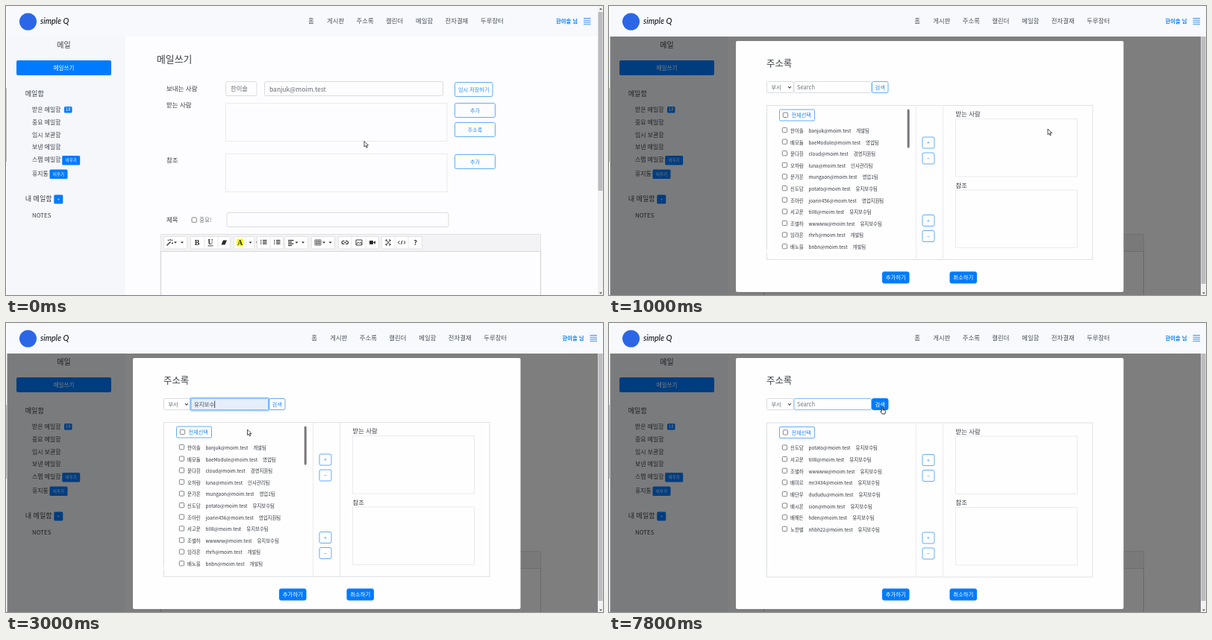
An HTML page for the animation above (8000 ms loop, 800x388 px).

```html
<!DOCTYPE html>
<html lang="ko">
<head>
<meta charset="utf-8">
<style>
html, body { margin: 0; width: 100%; height: 100%; overflow: hidden; background: #fdfdff; }
svg { display: block; }
text { font-family: "Noto Sans CJK KR", "Noto Sans CJK", sans-serif; white-space: pre; }
</style>
</head>
<body>
<svg id="stage" width="800" height="388" viewBox="0 0 800 388"></svg>
<script>
const stage = document.getElementById('stage');
const BLUE = '#007bff', DARK = '#3c4046', GREY = '#6c757d', LINE = '#dadce2', PALE = '#ebebf0';
const STEP = 200, LOOP = 8000;

const text = (x, y, size, str, fill = DARK, more = '') =>
  `<text x="${x}" y="${y + size * .36}" font-size="${size}" fill="${fill}" ${more}>${str}</text>`;
const mid = (x, y, size, str, fill, more = '') => text(x, y, size, str, fill, 'text-anchor="middle" ' + more);
const rect = (x, y, w, h, fill, r = 0, more = '') =>
  `<rect x="${x}" y="${y}" width="${w}" height="${h}" rx="${r}" fill="${fill}" ${more}/>`;
const frame = (x, y, w, h, stroke = LINE, fill = 'none', r = 0) =>
  rect(x + .5, y + .5, w - 1, h - 1, fill, r, `stroke="${stroke}"`);
const path = (d, stroke, width = 1, fill = 'none') =>
  `<path d="${d}" stroke="${stroke}" stroke-width="${width}" fill="${fill}"/>`;
const ring = (x, y, w, h) => rect(x - 1.5, y - 1.5, w + 3, h + 3, '#80bdff', 3, 'opacity=".75"');
const check = (x, y, s = 6.5, stroke = '#777') =>
  rect(x, y, s, s, '#fff', 1, `stroke="${stroke}" stroke-width=".9"`);
const button = (x, y, w, h, str, size, full, fill = BLUE, ink = '#fff') =>
  frame(x, y, w, h, full ? fill : '#62acf8', full ? fill : 'none', 2) +
  mid(x + w / 2, y + h / 2, size, str, full ? ink : '#2a8bf5');

const ME = '한이솔';
const people = [
  '한이솔 banjuk 개발팀', '배모듈 baeModule 영업팀', '윤다흰 cloud 경영지원팀', '오하람 luna 인사관리팀',
  '문가온 mungaon 영업1팀', '신도담 potato 유지보수팀', '조아린 joarin456 영업지원팀', '서고운 tillll 유지보수팀',
  '조별하 wwwww 유지보수팀', '임라온 rhrh 개발팀', '배노을 bnbn 개발팀'
];
const found = people.filter(p => p.endsWith('유지보수팀')).concat(
  ['배미르 mr3434', '배단우 dududu', '배시온 sion', '배해든 hden', '노한별 nhbh22'].map(p => p + ' 유지보수팀'));
const mail = id => id + '@moim.test';

function header(wide) {
  const dx = wide ? 4.3 : 0, ux = wide ? 8.5 : 0;
  const nav = [[405, '홈'], [430, '게시판'], [469.5, '주소록'], [509, '캘린더'], [549, '메일함'], [588.5, '전자결재'], [636, '두루장터']];
  let s = rect(1.5, 0, 799, 41, '#f7f9fc') + '<circle cx="29.5" cy="21" r="11.5" fill="#2b66e6"/>' +
    '<text x="46" y="24" font-size="10.5" font-style="italic" font-weight="500" fill="#15181d" style="font-family:Lato,sans-serif">simple Q</text>';
  for (const [x, str] of nav) s += text(x + dx, 20, 8.4, str, '#4b5058', 'font-weight="500"');
  s += text(737 + ux, 20, 7.3, ME + ' 님', '#0a7cfb', 'font-weight="700"');
  for (let i = 0; i < 4; i++) s += rect(774 + ux, 16 + i * 2.6, 9.5, 1, '#3d8fe8');
  return s;
}

function sidebar() {
  let s = rect(1.5, 41, 158.5, 347, '#f5f7fb') + mid(77.5, 52.6, 10, '메일') +
    rect(14, 73, 127, 20, BLUE, 2) + mid(77.5, 83, 7.5, '메일쓰기', '#fff') +
    text(25.7, 117.6, 9.1, '메일함') + text(25.7, 259, 9.1, '내 메일함');
  [['받은 메일함', 139.2], ['중요 메일함', 156], ['임시 보관함', 173], ['보낸 메일함', 189.4],
   ['스팸 메일함', 206.4], ['휴지통', 225.3], ['NOTES', 281]].forEach(([str, y]) => s += text(35, y, 7.9, str));
  const tag = (x, y, w, h, str, size) => rect(x, y, w, h, BLUE, 1.5) + mid(x + w / 2, y + h / 2, size, str, '#fff');
  return s + tag(78, 135, 10.5, 8.5, '18', 5.8) + tag(75.2, 201, 24, 12.5, '비우기', 5.4) +
    tag(58.5, 219.5, 24, 12.5, '비우기', 5.4) + tag(64.3, 253.5, 12, 12, '+', 6);
}

function editor() {
  const K = '#2b2b2b';
  const bars = (x, ws) => ws.map((w, i) => rect(x, 314 + i * 2.3, w, 1.2, K)).join('');
  const drop = x => path(`M${x} 316.5h4l-2 2.2z`, 'none', 0, K);
  let s = frame(207, 306, 510, 100, '#cfd0d4', '#fdfdff', 1) + rect(207.5, 306.5, 509, 23, '#f3f3f5') +
    rect(207, 329, 510, 1, '#d6d7da');
  [[211, 32], [247, 54], [305, 28], [336, 36], [373, 32], [409, 32], [445, 55], [503, 55]]
    .forEach(([x, w]) => s += frame(x, 309, w, 17.5, '#e2e2e5', '#fff', 1));
  for (const x of [266, 284, 322, 354, 463, 482, 521, 539]) s += rect(x - .5, 310, 1, 15.5, '#e8e8eb');
  const bold = 'font-weight="700" style="font-family:\'Liberation Serif\',serif"';
  s += path('M215.5 321.5l5-5M220 313v2M217 314l1 1M223 314l-1 1M222 318.5h2', K, 1.3) + drop(225) + drop(234) +
    mid(256, 317.5, 10, 'B', K, bold) + mid(274, 317, 9.5, 'U', K, bold) + rect(270.5, 321.5, 7, .9, K) +
    path('M291 314.5h5l-2.5 6h-5z', 'none', 0, K) + rect(309, 312.5, 9, 10, '#ffff00') +
    mid(313.5, 317.5, 10, 'A', K, bold) + drop(325.5) + path('M335 317h1', K);
  for (const x of [341, 359]) s += bars(x + 3, [5.5, 5.5, 5.5]) + bars(x, [1.3, 1.3, 1.3]);
  s += bars(378, [7.5, 5, 7.5, 5]) + drop(387.5) + drop(396) +
    path('M414 314h8v7h-8zM414 316.3h8M414 318.7h8M416.7 314v7M419.4 314v7', K, .7) + drop(424) + drop(432.5) +
    path('M453.5 315.5h-1.5a2 2 0 0 0 0 4h1.5M455 315.5h1.5a2 2 0 0 1 0 4h-1.5M452.5 317.5h3.5', K, 1.1) +
    path('M469 314h8v7h-8zM469.5 320l2.3-3 1.7 1.6 1.6-1.4 1.5 2.8', K, .9) +
    rect(487, 315, 5, 5, K, .8) + path('M492 317.5l3-2.2v4.4z', 'none', 0, K) +
    path('M509 316v-2h2M513 314h2v2M515 319v2h-2M511 321h-2v-2M509.5 314.5l5.5 6M515 314.5l-5.5 6', K, .9) +
    path('M527.5 315.5l-2.2 2 2.2 2M533 315.5l2.2 2-2.2 2M531 314.8l-1.4 5.4', K, 1) +
    mid(548.5, 317.5, 9, '?', K, 'font-weight="900"');
  return s;
}

function form(pressed) {
  let s = text(202, 71, 12.9, '메일쓰기');
  [['보내는 사람', 111], ['받는 사람', 133], ['참조', 206.5], ['제목', 287]].forEach(([str, y]) => s += text(215, y, 8.5, str));
  s += frame(294, 101, 42.5, 20, LINE, 'none', 2) + text(301, 111.2, 8.3, ME, '#666b72') +
    frame(346, 101, 240, 20, LINE, 'none', 2) + text(353, 111.5, 8.5, mail('banjuk'), '#666b72') +
    frame(294, 130, 297.5, 52, PALE) + frame(294, 198, 297.5, 52, PALE) +
    check(249, 284, 6.3) + text(259, 287.5, 7.6, '중요!', GREY) + frame(295.5, 277, 298, 20, LINE, 'none', 2) +
    button(601, 102, 51.5, 20, '임시 저장하기', 7.2) + button(601, 130, 55, 20, '추가', 7);
  if (pressed) s += ring(601, 156, 55, 20);
  return s + button(601, 156, 55, 20, '주소록', 7, pressed, '#5ca6fa', '#9bcaff') +
    button(601, 199, 55, 20, '추가', 7) + editor();
}

function list(filtered) {
  const rows = filtered ? found : people, d = filtered ? .5 : 0;
  let s = frame(211, 133, 437.5, 208, '#dfe1e6') + rect(411, 133, 1, 208, PALE) + rect(447, 133, 1, 208, PALE) +
    frame(228, 138.5, 48, 16, '#62acf8', '#fff', 1.5) + check(233.3, 143.2, 6.3) + text(244.5, 146.8, 7.2, '전체선택', '#1f86f8');
  rows.forEach((row, i) => {
    const y = 167 + i * 15.62, [name, id, team] = row.split(' ');
    s += check(232.3, y - 3.6, 6.3) +
      text(243, y + .6, 6.4, `${name}<tspan dx="6.8">${mail(id)}</tspan><tspan dx="7">${team}</tspan>`, '#33373d');
  });
  if (!filtered) s += rect(211.5, 326.8, 199, 5, '#fff') + rect(399.7, 138.5, 3, 52, '#77777a', 1.5);
  for (const y of [175.5, 280]) s += button(419.5, y, 17, 16, '+', 7) + button(419.5, y + 21, 17, 16, '−', 7);
  [['받는 사람', 145], ['참조', 240.5]].forEach(([str, y]) => s += text(464.5, y, 8.4, str) + frame(464, y + 6, 164, 78.5, PALE));
  return `<g transform="translate(0 ${d})">${s}</g>`;
}

function searchBar(t, x) {
  const focus = (t >= 2000 && t < 3600) || (t >= 5600 && t < 7800);
  const word = t < 2600 || t >= 7000 ? '' : '유지보수'.slice(0, t < 2800 ? 1 : t < 3000 ? 2 : 4);
  const hot = (t >= 3600 && t < 5400) || t >= 7600;
  const label = fill => text(252, 109.3, 7.4, word, fill);
  let s = frame(211, 101, 36.5, 16, LINE, '#fff', 1) + text(217.5, 109.2, 7.2, '부서', GREY) +
    path('M240 108l2 2.2 2-2.2', '#444', 1.1);
  if (focus) s += ring(247.5, 101, 104.5, 16);
  s += frame(247.5, 101, 104.5, 16, focus || t >= 7800 ? '#80bdff' : LINE, word ? '#e5eefa' : '#fff', 1) +
    (word ? label('#495057') : text(252, 109.2, 7.5, 'Search', GREY));
  if (focus && t < 3400) s += rect(252 + word.length * 6.83, 104.5, .8, 9.5, '#222');
  if (t >= 5600 && t < 7000) {
    const from = Math.max(252, x), w = 279.3 - from;
    if (w > 0) s += `<svg x="${from}" y="103.5" width="${w}" height="11" viewBox="${from} 103.5 ${w} 11">` +
      rect(252, 103.5, 28, 11, '#2f7fd8') + label('#fff') + '</svg>';
  }
  if (hot && t < 5400) s += ring(352, 101, 22.5, 16);
  return s + button(352, 101, 22.5, 16, '검색', 7.3, hot);
}

const modal = (t, x) => rect(170, 47, 519.5, 337, '#fefeff', 2) + text(211, 78, 12.4, '주소록') + searchBar(t, x) +
  list(t >= 4800) + button(366, 356.5, 36.5, 16, '추가하기', 7.4, true) + button(456.5, 356.5, 36.5, 16, '취소하기', 7.4, true);

// time, x, y of the pointer tip
const trail = [[0, 480, 181.5], [200, 496, 179], [600, 604, 163.5], [800, 604, 163.5], [1000, 588, 165], [1200, 539, 169.5],
  [1400, 520, 160], [2000, 300, 110], [2400, 300, 110], [2600, 318, 150], [3000, 323.5, 143], [3200, 335, 132],
  [3600, 365, 112.5], [4000, 363, 111.5], [4400, 365, 112.5], [5200, 365, 112.5], [5400, 330, 110], [5600, 284, 109],
  [6400, 250, 108], [6600, 246.8, 107], [7200, 246.8, 107], [7400, 300, 109], [7600, 356, 111], [7800, 366, 112.5]];
function pointer(t) {
  const i = trail.findIndex(k => k[0] > t);
  if (i < 0) return trail[trail.length - 1].slice(1);
  const a = trail[i - 1], b = trail[i], p = (t - a[0]) / (b[0] - a[0]);
  return [a[1] + (b[1] - a[1]) * p, a[2] + (b[2] - a[2]) * p];
}
function cursor(x, y, t) {
  const inBar = t >= 1200 && y > 101 && y < 117;
  let d = path('M0 0v7.6l1.8-1.6 1.2 2.8 1.3-.6-1.2-2.7h2.4z', '#222', .8, '#fff');
  if (inBar && x > 351) d = path('M-.6 1a.8.8 0 0 1 1.5 0v3l3 .8q.8.4.6 1.5l-.7 3.2h-3.8l-2.4-3.4q.5-1 1.8 0z', '#222', .9, '#fff');
  else if (inBar && x > 248) d = path('M-1.5-4h3M0-4v8M-1.5 4h3', '#333', .8);
  return `<g transform="translate(${x} ${y})">${d}</g>`;
}

function scrollbar(top, y, h) {
  return rect(793, top, 7, 388 - top, '#f1f1f2') + rect(793.5, y, 6, h, '#bcbcbf') +
    path('M795 384.5h4l-2 2.3z', 'none', 0, '#555');
}

function scene(t) {
  const [x, y] = pointer(t), dim = t >= 800, open = t >= 1000;
  let s = rect(0, 0, 800, 388, '#fdfdff') + sidebar() + form(t >= 600 && !open);
  if (dim) s += rect(1.5, 41, 798.5, 347, '#000', 0, `opacity="${open ? .5 : .26}"`);
  if (open) s += modal(t, x) + scrollbar(41, 41, 332);
  s += header(dim);
  if (!dim) s += scrollbar(0, 8, 240) + path('M795 5h4l-2-2.3z', 'none', 0, '#555');
  return s + rect(0, 110, 1, 99, '#b9b9bd') + cursor(x, y, t);
}

let shown = -1;
function tick(now) {
  const t = Math.floor(now % LOOP / STEP) * STEP;
  if (t !== shown) stage.innerHTML = scene(shown = t);
  requestAnimationFrame(tick);
}
tick(performance.now());
</script>
</body>
</html>
```
